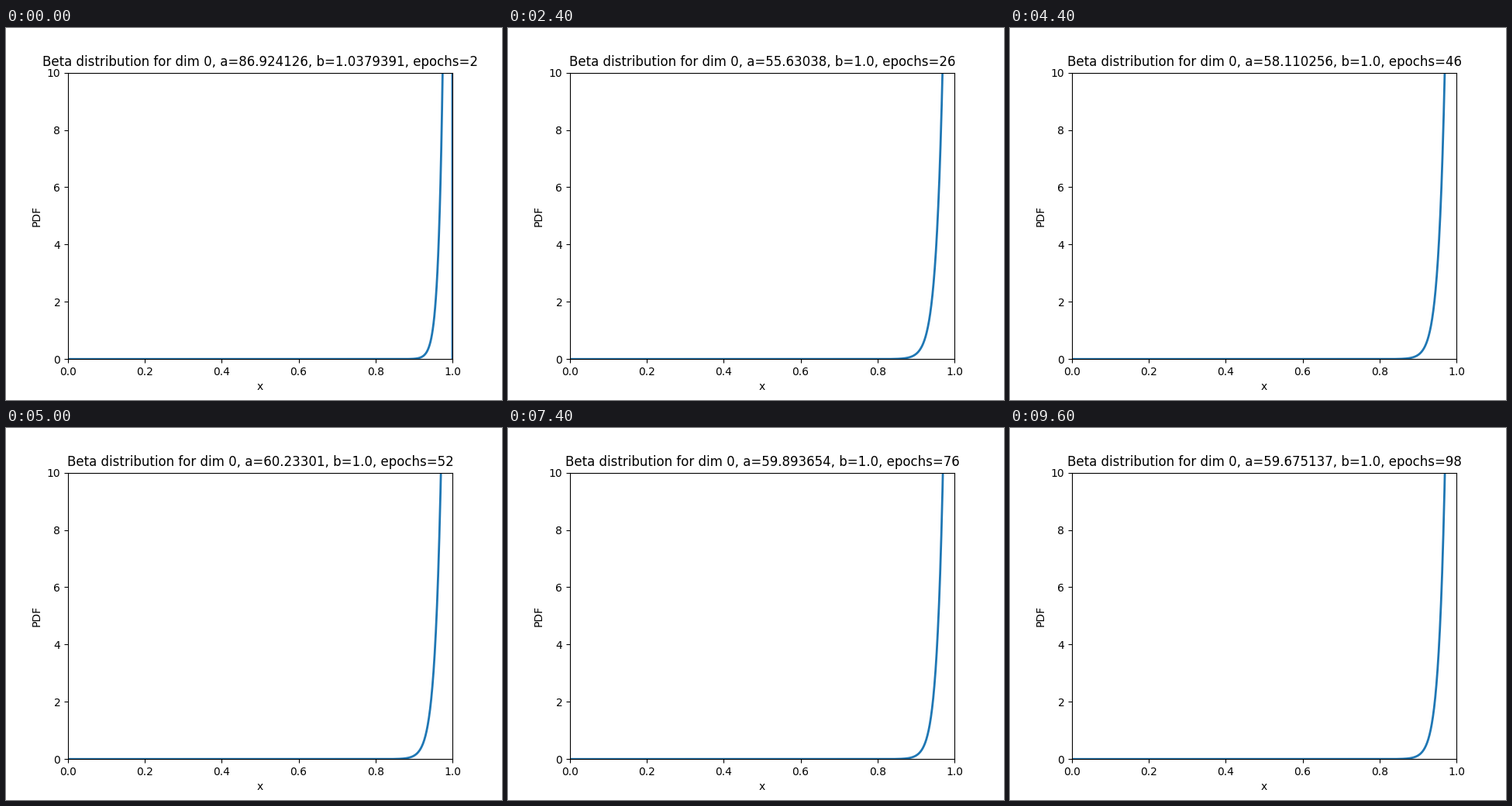
Recreate the animation shown at these times as a matplotlib script. Size 640 px wide and 480 px high, loop 9.8 s.

```python
import math

import matplotlib.pyplot as plt
import numpy as np
from matplotlib.animation import FuncAnimation

FRAMES = 49
INTERVAL = 200

# Fitted shape parameter a at a few epochs; it drifts between them.
EPOCHS = [14, 38, 52, 66, 86, 98]
SHAPES = [55.980835, 55.279922, 60.23301, 59.674168, 60.113136, 59.675137]
START_A, START_B = 86.924126, 1.0379391
SETTLE = 12  # epochs until the initial transient is gone


def params(epoch):
    """Return the two shape parameters at the given epoch."""
    a = np.interp(epoch, EPOCHS, SHAPES)
    s = min((epoch - 2) / SETTLE, 1)
    decay = (math.exp(-4 * s) - math.exp(-4)) / (1 - math.exp(-4))
    a += (START_A - SHAPES[0]) * decay
    b = START_B if epoch == 2 else 1.0
    return np.float32(a), np.float32(b)


def beta_pdf(x, a, b):
    log_norm = math.lgamma(a + b) - math.lgamma(a) - math.lgamma(b)
    return math.exp(log_norm) * x ** (a - 1) * (1 - x) ** (b - 1)


fig, ax = plt.subplots(figsize=(6.4, 4.8), dpi=100)
x = np.linspace(0, 1, 1000)
line, = ax.plot([], [], color="#1f77b4", lw=2)
ax.set(xlim=(0, 1), ylim=(0, 10), xlabel="x", ylabel="PDF")
title = ax.set_title("")


def update(frame):
    epoch = 2 + 2 * frame
    a, b = params(epoch)
    line.set_data(x, beta_pdf(x, float(a), float(b)))
    title.set_text(f"Beta distribution for dim 0, a={str(a)}, b={str(b)}, epochs={epoch}")
    return line, title


anim = FuncAnimation(fig, update, frames=FRAMES, interval=INTERVAL,
                     repeat=True, repeat_delay=0, blit=False)
plt.show()
```
